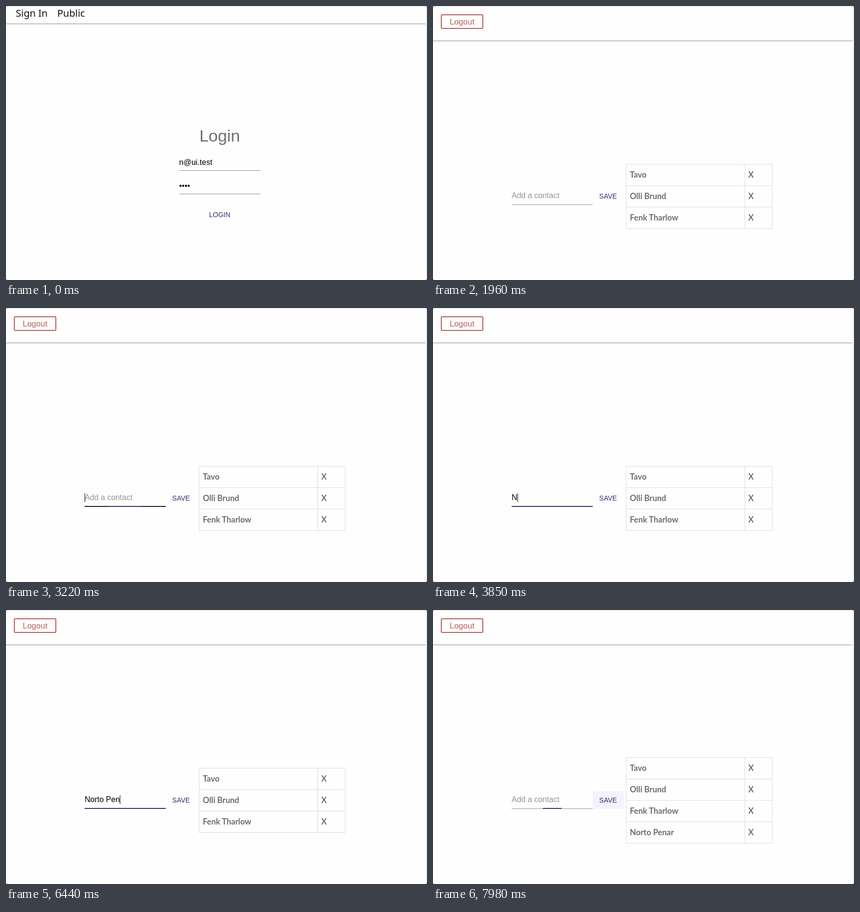
Recreate the animation shown at these times as an HTML page. Size 862 by 562 pixels, loop 8 s.

```html
<!DOCTYPE html>
<html lang="en">
<head>
<meta charset="utf-8">
<title>Login and contacts</title>
<style>
  html, body { margin: 0; width: 100%; height: 100%; overflow: hidden; background: #fefefe; }
  svg { display: block; width: 100vw; height: 100vh; }
  text { font: 16px "Liberation Sans", Arial, sans-serif; fill: #000; }
  .nav { font: 20px "Noto Sans", sans-serif; fill: #111; }
  .title { font-size: 34px; fill: #6f6f6f; }
  .btn { font-size: 14px; fill: #2d316b; }
  .logout { font-size: 16.5px; fill: #b5605c; }
  .hint { fill: #949494; }
  .cell { font: 700 16.5px Lato, sans-serif; fill: #6c6c6c; }
  .line { fill: #949494; }
  .hover { fill: #f4f2fc; }
  .grid { fill: none; stroke: #dcdcdc; }
</style>
</head>
<body>
<svg viewBox="0 0 862 562">
  <rect width="862" height="562" fill="#fefefe"/>
  <path d="M0 .5H862M860.5 0V562" stroke="#dedede"/>
  <path d="M0 0h2l-2 2zM862 0v2l-2-2zM0 562v-2l2 2zM862 562h-2l2-2z" fill="#555"/>
  <g id="rule">
    <rect width="859" height="1" fill="#9a9a9a"/>
    <rect y="1" width="859" height="1" fill="#ececec"/>
  </g>

  <g id="login">
    <text class="nav" x="20" y="22">Sign In</text>
    <text class="nav" x="105" y="22">Public</text>
    <text class="title" x="437.5" y="278" text-anchor="middle">Login</text>
    <text x="354.5" y="326">n@ui.test</text>
    <rect class="line" x="355" y="337" width="166" height="1"/>
    <text x="354.5" y="374">••••</text>
    <rect class="line" x="355" y="385" width="166" height="1"/>
    <rect id="loginHover" class="hover" x="363" y="410" width="150" height="36" rx="4"/>
    <text class="btn" x="437.5" y="433" text-anchor="middle">LOGIN</text>
  </g>

  <g id="contacts">
    <rect x="17" y="18" width="85" height="28" rx="2" fill="none" stroke="#b5605c" stroke-width="2"/>
    <text class="logout" x="59.5" y="38" text-anchor="middle">Logout</text>
    <text id="hint" class="hint" x="161" y="394">Add a contact</text>
    <text id="typed" x="161" y="394"></text>
    <rect id="caret" y="380" width="1" height="18"/>
    <rect id="line" x="161" width="166"/>
    <rect id="focus" y="406" height="2" fill="#34376f"/>
    <rect id="saveHover" class="hover" x="327" y="372" width="64" height="36" rx="4"/>
    <text class="btn" x="358.5" y="395" text-anchor="middle">SAVE</text>
    <g id="table"></g>
  </g>
</svg>

<script>
const LOOP = 8000, TICK = 70;
const NEW_NAME = 'Norto Penar';
const NAMES = ['Tavo', 'Olli Brund', 'Fenk Tharlow', NEW_NAME];
const KEY_TIMES = [3850, 4270, 4550, 4760, 4970, 5250, 5810, 6160, 6440, 6650, 6790];
const PAGE = 1960, POINT = 2660, FOCUS = 3220, BLUR = 7897, SAVED = 7980;
const ROW = 44, MIDDLE = 390.5;

const $ = id => document.getElementById(id);
const set = (id, attrs) => {
  for (const name in attrs) $(id).setAttribute(name, attrs[name]);
};
const show = (id, on) => set(id, { visibility: on ? 'inherit' : 'hidden' });
const progress = (t, start, length) => Math.min(1, Math.max(0, (t - start) / length));

// cubic-bezier(0, 0, .2, 1)
function easeOut(x) {
  let low = 0, high = 1;
  for (let i = 0; i < 20; i++) {
    const u = (low + high) / 2;
    if (0.6 * u * u + 0.4 * u ** 3 < x) low = u; else high = u;
  }
  return low * low * (3 - 2 * low);
}

let shownRows = 0;
function drawTable(count) {
  if (count === shownRows) return;
  shownRows = count;
  const top = MIDDLE - count * ROW / 2, bottom = top + count * ROW;
  let path = `M395.5 ${top}V${bottom}M638.5 ${top}V${bottom}M694.5 ${top}V${bottom}`;
  for (let i = 0; i <= count; i++) path += `M395 ${top + i * ROW}H695`;
  const cells = NAMES.slice(0, count).map((name, i) => {
    const y = top + i * ROW + 27.5;
    return `<text class="cell" x="403" y="${y}">${name}</text><text class="cell" x="645.5" y="${y}">X</text>`;
  });
  $('table').innerHTML = `<path class="grid" d="${path}"/>` + cells.join('');
}

function drawInput(t) {
  const saved = t >= SAVED;
  const count = saved ? 0 : KEY_TIMES.filter(time => time <= t).length;
  $('typed').textContent = NEW_NAME.slice(0, count).replace(' ', '\u00a0');
  show('hint', count === 0);

  const caretOn = t >= FOCUS && t < 7350 && !(t >= 3710 && t < KEY_TIMES[0]);
  show('caret', caretOn);
  const end = count ? $('typed').getComputedTextLength() : 0;
  set('caret', { x: Math.round(161 + end) });

  const pointed = t >= POINT && t < BLUR;
  const grey = pointed ? Math.round(139 - 106 * progress(t, POINT, 210)) : 148;
  set('line', { y: pointed ? 406 : 407, height: pointed ? 2 : 1, fill: `rgb(${grey},${grey},${grey})` });

  const scale = easeOut(progress(t, FOCUS - 30, 200)) - easeOut(progress(t, BLUR, 200));
  const width = 166 * scale;
  set('focus', { x: 244 - width / 2, width });
}

function draw(time) {
  const t = Math.floor((time % LOOP) / TICK) * TICK;
  const signedIn = t >= PAGE;
  show('login', !signedIn);
  show('contacts', signedIn);
  set('rule', { transform: `translate(0 ${signedIn ? 71 : 36})` });
  set('loginHover', { opacity: progress(t, 1540, 210) });
  set('saveHover', { opacity: progress(t, 7700, 210) });
  drawTable(t >= SAVED ? 4 : 3);
  drawInput(t);
}

const start = performance.now();
function loop() {
  draw(performance.now() - start);
  requestAnimationFrame(loop);
}
loop();
</script>
</body>
</html>
```
